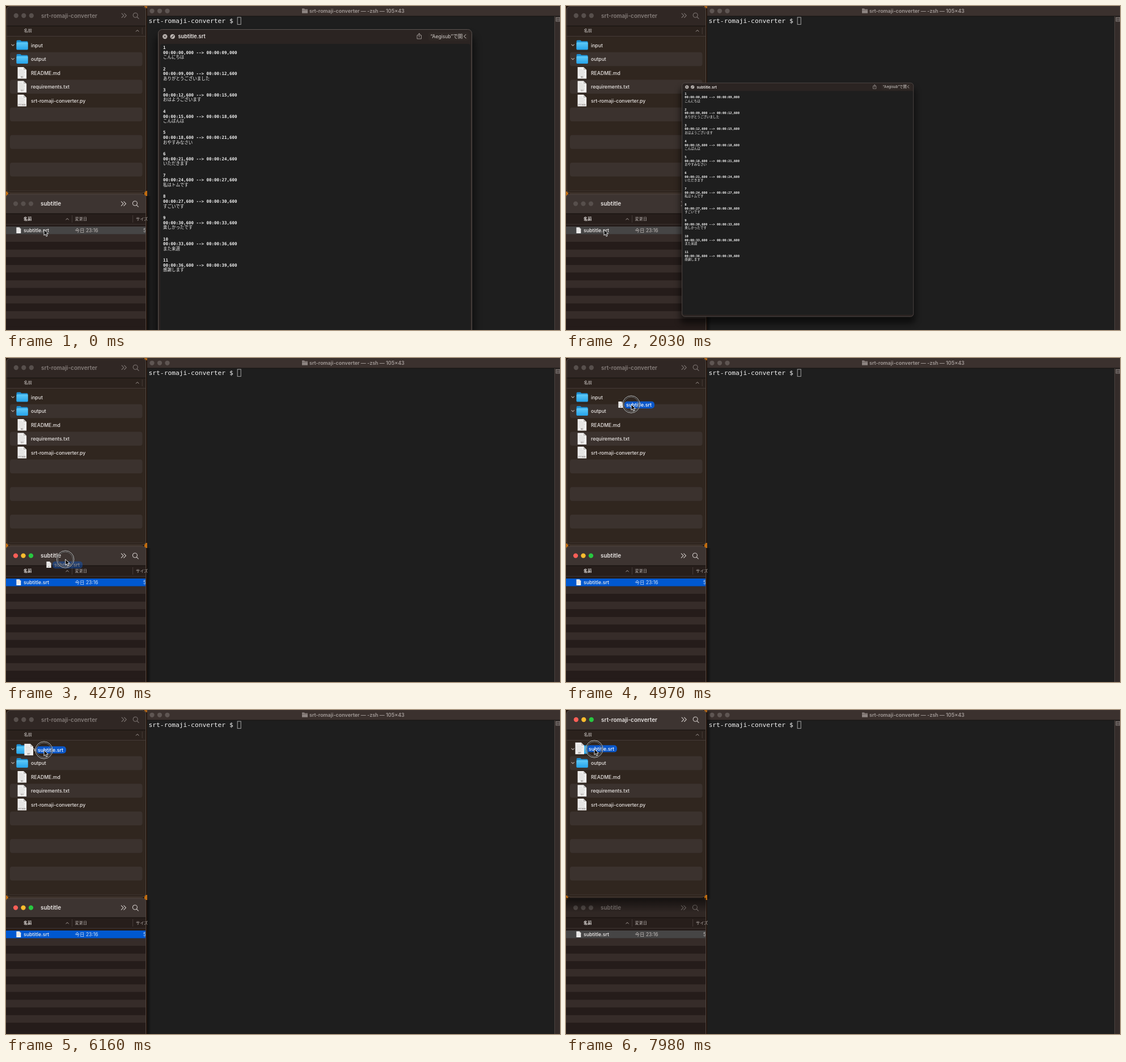
An HTML page that plays this animation: 977 px wide and 573 px high, repeating every 8 s.

```html
<!DOCTYPE html>
<html lang="ja">
<head>
<meta charset="utf-8">
<title>srt-romaji-converter</title>
<style>
html, body { margin: 0; width: 100%; height: 100%; overflow: hidden; background: #1e1e1e; }
svg { display: block; width: 977px; height: 573px; }
text { font-family: Inter, "Noto Sans CJK JP", "Noto Sans CJK", sans-serif; white-space: pre; }
.mono, .mono text { font-family: "DejaVu Sans Mono", "Noto Sans CJK JP", "Noto Sans CJK", monospace; }
.win { --bar: #302724; --title: #857d7a; --tool: #7d7572; --r: #574f4c; --y: #574f4c; --g: #574f4c; }
.win.main { --bar: #3d3431; --title: #e8e4e2; --tool: #d0cac7; }
.win.key { --r: #ff5f57; --y: #febc2e; --g: #28c840; }
.bar { fill: var(--bar); }
.title { fill: var(--title); }
.tool { fill: none; stroke: var(--tool); stroke-width: 1.1; stroke-linecap: round; stroke-linejoin: round; }
</style>
</head>
<body>
<script>
const W = 977, H = 573, LOOP = 8000, STEP = 70;

// drawing helpers; text is placed by its vertical middle
const rect = (x, y, w, h, fill, more = '') =>
  `<rect x="${x}" y="${y}" width="${w}" height="${h}" fill="${fill}" ${more}/>`;
const text = (x, y, size, str, fill, more = '') =>
  `<text x="${x}" y="${y + size * 0.36}" font-size="${size}" fill="${fill}" ${more}>${str}</text>`;
const dot = (x, y, r, fill, more = '') => `<circle cx="${x}" cy="${y}" r="${r}" fill="${fill}" ${more}/>`;
const line = (d, color, w = 1) =>
  `<path d="${d}" fill="none" stroke="${color}" stroke-width="${w}" stroke-linecap="round" stroke-linejoin="round"/>`;
const group = (id, body, more = '') => `<g id="${id}" ${more}>${body}</g>`;
const bold = 'font-weight="600"', medium = 'font-weight="500"';

const lights = (x, y, colors) => colors.map((c, i) => dot(x + i * 13.5, y, 4.15, c)).join('');
const winLights = (x, y) => lights(x, y, ['var(--r)', 'var(--y)', 'var(--g)']);
const tools = (x, y) => `<g class="tool" transform="translate(${x} ${y})">
  <path d="M-24.5-3.7l3.7 3.7l-3.7 3.7M-20-3.7l3.7 3.7l-3.7 3.7M2.5 2.5l3 3"/><circle cx="-.4" cy="-.6" r="4"/></g>`;

const page = label => `<path d="M-7.8-10.3h10.4l5.2 5.2v15.4h-15.6z" fill="#f1f0ef"/>
  <path d="M2.6-10.3v5.2h5.2z" fill="#c4c2c0"/>` +
  line('M-5-6h5M-5-3.5h8M-5-1h10M-5 1.5h8M-5 4h9', '#c9c7c5', 0.7) +
  text(0, 7.6, 2.9, label, '#77726f', 'text-anchor="middle" font-weight="600"');
const pageAt = (x, y, label, s = 1) => `<g transform="translate(${x} ${y}) scale(${s})">${page(label)}</g>`;

const folder = y => line(`M9.8 ${y - 1.2}l2.3 2.4l2.3-2.4`, '#a9a19d', 1.1) +
  `<path d="M18.5 ${y - 7}q0-1.8 1.8-1.8h5l2 1.8h9.5q1.8 0 1.8 1.8v12h-20.1z" fill="#1e8fd2"/>` +
  rect(18.5, y - 5, 20.2, 13.4, 'url(#blue)', 'rx="1.6"');

function terminal() {
  return rect(249, 0, 728, H, '#1e1e1e') + rect(249, 0, 728, 18, '#3b312e') +
    rect(249, 17.5, 728, 1, '#151211') +
    lights(257.5, 8.8, ['#5f5653', '#5f5653', '#5f5653']) +
    `<path d="M522 4.5h4l1 1.2h5v7h-10z" fill="#8d8481"/>` + line('M522.5 7.4h9', '#5d5451', 0.7) +
    text(535, 8.9, 8.95, 'srt-romaji-converter — -zsh — 105×43', '#a39b98', bold) +
    text(251.5, 26.3, 11.27, 'srt-romaji-converter $ ', '#f4f4f4', 'class="mono"') +
    rect(408.2, 20, 6, 12.6, 'none', 'stroke="#a5a5a5"') +
    rect(967.5, 18.5, 10, H, '#342c2a') + rect(967, 18.5, 1, H, '#4a423f') +
    rect(970, 20.5, 7, 6.5, 'none', 'stroke="#968f8c" stroke-width=".9"') +
    line('M971 22.8h6M971 24.8h6', '#968f8c', 0.8);
}

function topWindow() {
  const rows = [81.8, 130.6, 179.4, 228.2, 277].map(y => rect(7, y, 233.5, 24.5, '#3b322e', 'rx="4"')).join('');
  const names = ['input', 'output', 'README.md', 'requirements.txt', 'srt-romaji-converter.py'];
  return rect(0.5, 0.5, 246.5, 331, '#30261f', 'rx="7"') +
    `<path class="bar" d="M.5 35v-28q0-6.5 6.5-6.5h233q7 0 7 6.5v28z"/>` +
    rect(0.5, 35, 246, 18.5, '#2b221d') + rect(0.5, 34.8, 246, 1, '#15100d') + rect(0.5, 53, 246, 1, '#453b36') +
    rows + rect(6, 326, 235, 1, '#3a312b') +
    winLights(17.8, 17) + tools(228.6, 16.8) +
    text(62, 17, 10, 'srt-romaji-converter', 'var(--title)', bold) +
    text(31.5, 43.6, 7.2, '名前', '#dcd7d4', medium) +
    line('M229.3 45l2.4-2.4l2.4 2.4', '#a8a09c') + rect(239.8, 38, 0.8, 12, '#4e4540') +
    folder(69.2) + folder(93.7) +
    pageAt(28.3, 118.2, 'MD') + pageAt(28.3, 142.7, 'TXT') + pageAt(28.3, 167.1, 'PYTHON') +
    names.map((n, i) => text(44, 69.6 + i * 24.45, 8.65, n, '#e9e5e3', medium)).join('') +
    rect(1, 0.5, 245.5, 330.5, 'none', 'rx="7" stroke="#554b45" stroke-width=".9"');
}

function lowWindow() {
  let stripes = '';
  for (let i = 0; i < 13; i++) stripes += rect(0, 390 + i * 13.6, 246.5, 13.6, i % 2 ? '#362c29' : '#251c1a');
  return rect(0, 332.5, 247, 250, '#251c1a', 'rx="7"') +
    `<path class="bar" d="M0 367v-28q0-6.5 6.5-6.5h233.5q7 0 7 6.5v28z"/>` +
    rect(0, 367, 246.5, 19, '#271e1b') + rect(0, 366.7, 246.5, 1, '#130e0c') + rect(0, 385.6, 246.5, 1, '#423835') +
    stripes + rect(0, 390, 246.5, 13.6, '#464545', 'id="row"') +
    winLights(17, 349.6) + tools(227.8, 349.6) +
    text(61, 349.6, 10, 'subtitle', 'var(--title)', bold) +
    text(31, 376.5, 7.2, '名前', '#ece8e6', bold) +
    line('M105.8 378l2.3-2.4l2.3 2.4', '#a8a09c') +
    text(121.5, 376.5, 7.2, '変更日', '#b9b2af') + text(229, 376.5, 7.2, 'サイズ', '#b9b2af') +
    rect(116.3, 370, 0.8, 13, '#4e4542') + rect(223.3, 370, 0.8, 13, '#4e4542') +
    pageAt(22.3, 396.8, '', 0.51) +
    text(31, 397, 8.8, 'subtitle.srt', '#f0edec', medium) +
    group('meta', text(121.5, 397, 8.5, '今日 23:16', 'inherit') + text(242, 397, 8.5, '5', 'inherit')) +
    line('M0 340q0-7 7-7h232.5q7 0 7 7V580', '#554b46', 0.9);
}

function preview() {
  const cues = ['こんにちは', 'ありがとうございました', 'おはようございます', 'こんばんは', 'おやすみなさい', 'いただきます',
    '私はトムです', 'すごいです', '楽しかったです', 'また来週', '感謝します'];
  const stamp = s => `00:00:${s.toFixed(1).padStart(4, '0').replace('.', ',')}00`;
  const begin = i => i === 0 ? 0 : i === 1 ? 9 : 6.6 + i * 3;
  const white = '#f3f3f3', heavy = 'font-weight="700"';
  const lines = cues.map((cue, i) => {
    const y = 73.2 + i * 37.63;
    return text(277, y, 7.47, i + 1, white, heavy) +
      text(277, y + 8.8, 7.47, `${stamp(begin(i))} --&gt; ${stamp(begin(i + 1))}`, white, heavy) +
      text(277, y + 17.3, 7.47, cue, white, medium);
  }).join('');
  const body = rect(272, 67, 547, 531, '#1e1e1e', 'rx="4"') + `<g class="mono">${lines}</g>`;
  const head = dot(280.3, 54, 4.2, '#bdb7b4') + line('M278.8 52.5l3 3m0-3l-3 3', '#2c2523', 1) +
    dot(293.8, 54, 4.2, '#bdb7b4') + line('M292 55.8l3.6-3.6', '#2c2523', 1.2) +
    text(303.5, 53.8, 9.2, 'subtitle.srt', '#ece8e6', bold) +
    line('M727 51.7h-2v6.3h7.4v-6.3h-2M728.7 55v-6.5m-2 2l2-2l2 2', '#aaa3a0', 0.9) +
    rect(745, 46.5, 71, 14.5, '#2f2825', 'rx="3"') +
    text(748.5, 53.8, 8.6, '“Aegisub”で開く', '#d5d0cd');
  return rect(264, 52, 562, 566, '#000', 'rx="12" opacity=".55" filter="url(#soft)"') +
    rect(268.5, 41.5, 553, 560, '#2b2422', 'rx="7"') +
    group('body', body) + group('head', head) +
    rect(268.5, 41.5, 553, 560, 'none', 'rx="7" stroke="#5c5451"');
}

const drag = group('icon', page('SRT')) +
  group('label', rect(0, -6.2, 53, 12.4, '#0a57c9', 'rx="5"') +
    text(3, 0, 8.8, 'subtitle.srt', '#fff', medium));
const ring = dot(0, 0, 14, 'none', 'stroke="#000" stroke-opacity=".4" stroke-width="4"') +
  dot(0, 0, 15.2, 'none', 'stroke="#d8d8d8" stroke-width=".9"') +
  dot(0, 0, 13, 'none', 'stroke="#c0c0c0" stroke-opacity=".75" stroke-width=".8"');
const arrow = `<path d="M0 0v10.2l2.4-2.2l1.7 3.9l1.9-.8l-1.7-3.8h3.3z"
  fill="#0a0a0a" stroke="#fff" stroke-width=".9" stroke-linejoin="round"/>`;

document.body.innerHTML = `<svg viewBox="0 0 ${W} ${H}" xmlns="http://www.w3.org/2000/svg">
<defs>
  <linearGradient id="blue" x2="0" y2="1"><stop stop-color="#5fcaf8"/><stop offset="1" stop-color="#25a3ea"/></linearGradient>
  <linearGradient id="right"><stop stop-color="#000" stop-opacity=".5"/><stop offset="1" stop-opacity="0"/></linearGradient>
  <linearGradient id="down" x2="0" y2="1"><stop stop-color="#000" stop-opacity=".6"/><stop offset="1" stop-opacity="0"/></linearGradient>
  <filter id="soft" x="-10%" y="-10%" width="120%" height="120%"><feGaussianBlur stdDeviation="7"/></filter>
</defs>` +
  rect(0, 0, 250, H, '#24160f') + rect(0, 328, 4, 8, '#c06c10') + rect(244, 327, 5, 9, '#c06c10') +
  rect(244, 0, 5, 4, '#a8621a') + terminal() +
  group('low', lowWindow(), 'class="win main"') + group('top', topWindow(), 'class="win"') +
  group('lowShade', rect(249, 336, 7, H, 'url(#right)')) +
  group('topShade', rect(249, 2, 7, 332, 'url(#right)') + rect(0, 332, 247, 26, 'url(#down)')) +
  group('preview', preview()) + group('drag', drag) + group('ring', ring) + group('arrow', arrow) + '</svg>';

const $ = id => document.getElementById(id);
const place = (id, x, y, s = 1) => $(id).setAttribute('transform', `translate(${x} ${y}) scale(${s})`);
const show = (id, on) => $(id).setAttribute('display', on ? 'inline' : 'none');
const mix = (a, b, u) => a + (b - a) * u;
const part = (t, a, b) => Math.min(1, Math.max(0, (t - a) / (b - a)));

// rows: time, x, y, and 1 to slow down towards that row
const mouse = [[0, 67, 395.5], [2380, 67, 395.5], [2450, 58, 398], [3150, 44, 396, 1], [4060, 44, 396],
  [4270, 104.7, 356], [4900, 116, 92], [4970, 115, 82], [5740, 67, 71, 1], [6440, 67, 71],
  [6860, 56, 69, 1], [7910, 56, 69], [7980, 50, 69]];
const pill = [[4060, 28, 397], [4270, 82, 366], [4900, 104, 93], [4970, 103, 83], [5740, 55, 70.5, 1],
  [6160, 53, 70.5], [6440, 53, 70.5], [6860, 37, 68.4, 1]];

function at(rows, t) {
  const n = rows.findIndex(r => r[0] > t);
  if (n < 1) return rows[n ? rows.length - 1 : 0].slice(1, 3);
  const a = rows[n - 1], b = rows[n];
  let u = part(t, a[0], b[0]);
  if (b[3]) u *= 2 - u;
  return [mix(a[1], b[1], u), mix(a[2], b[2], u)];
}

// the preview shrinks into the file's row; its head gets flatter on the way
function closePreview(t) {
  show('preview', t < 2240);
  const p = t < 2030 ? 0 : t < 2100 ? 0.27 : t < 2170 ? 0.7 : 0.94;
  const s = 1 - 0.97 * p, k = p > 0 ? 1 : 0;
  place('preview', mix(545, 40, p) - 545 * s, mix(321.5, 400, p) - 321.5 * s, s);
  place('body', -4.9 * k, -6.9 * k, 1 + 0.0095 * k);
  place('head', 0, -2.7 * k);
  $('preview').setAttribute('opacity', t < 2100 ? 1 : t < 2170 ? 0.8 : 0.4);
}

function draw(now) {
  const t = Math.floor(now / STEP) * STEP;
  const lowKey = t >= 2240 && t < 6440, topKey = t >= 6440;
  $('low').setAttribute('class', 'win' + (topKey ? '' : ' main') + (lowKey ? ' key' : ''));
  $('top').setAttribute('class', 'win' + (topKey ? ' main key' : ''));
  $('row').setAttribute('fill', lowKey ? '#0058d0' : '#464545');
  $('meta').setAttribute('fill', lowKey ? '#d3e2f8' : '#c2bdbb');
  show('lowShade', !topKey);
  show('topShade', topKey);
  closePreview(t);

  const [x, y] = at(mouse, t), [px, py] = at(pill, t), grow = part(t, 5740, 6160);
  place('arrow', x, y);
  place('ring', x, y);
  show('ring', t >= 3920);
  show('drag', t >= 4130);
  place('label', px, py);
  $('label').setAttribute('opacity', mix(0.2, 1, part(t, 4130, 4620)));
  place('icon', px - mix(6.5, 12.8, grow), py - 0.5, mix(0.53, 1, grow));
}

const start = performance.now();
function tick() {
  draw((performance.now() - start) % LOOP);
  requestAnimationFrame(tick);
}
tick();
</script>
</body>
</html>
```
